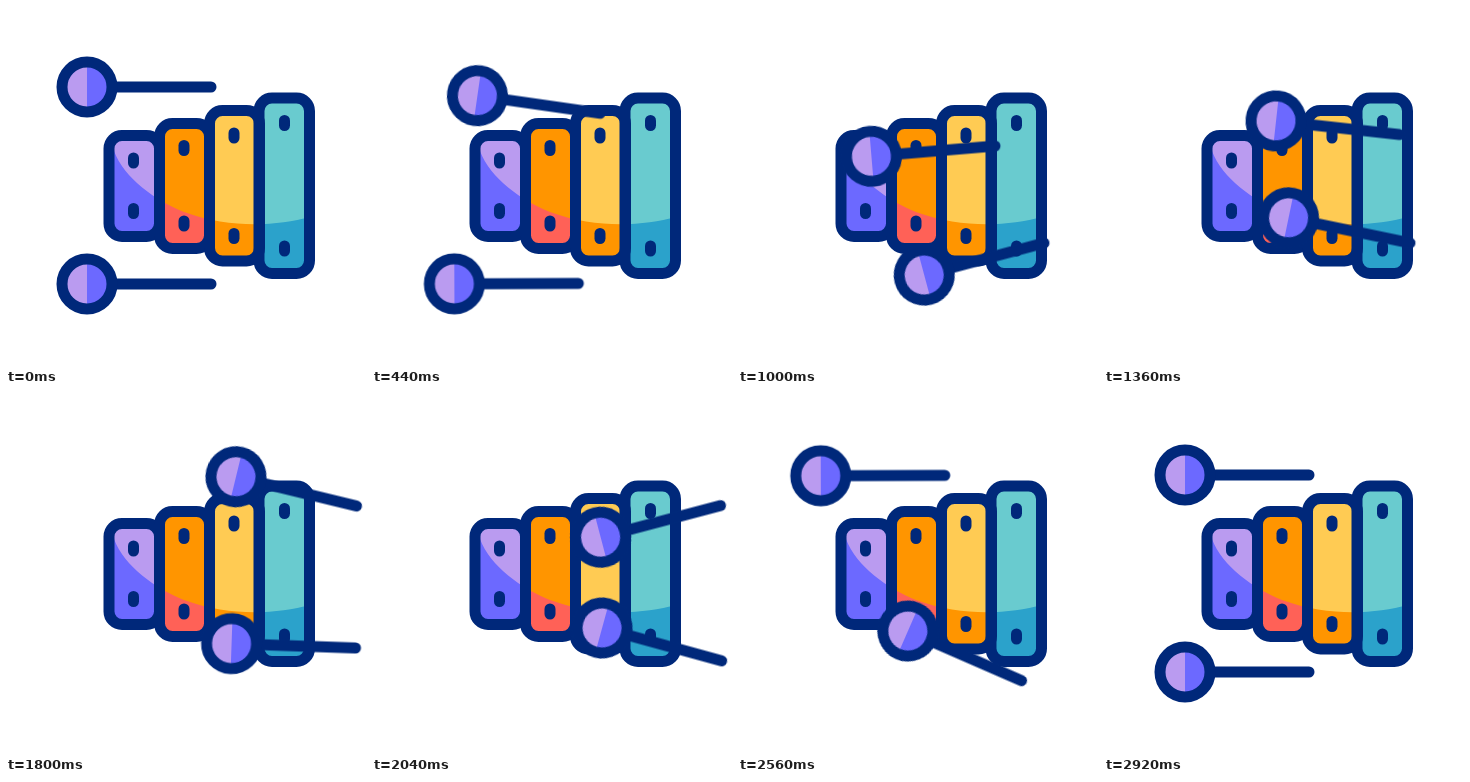
Animation of 360 by 360 pixels, one loop 3000 ms. Source, as an HTML page:

```html
<!DOCTYPE html>
<html lang="en">
<head>
<meta charset="utf-8">
<title>Xylophone</title>
<style>
  html, body { margin: 0; width: 100%; height: 100%; overflow: hidden; background: #fff; }
  svg { display: block; width: 100vw; height: 100vh; }
  .line { fill: none; stroke: #00287a; stroke-width: 11; stroke-linecap: round; }
  .mallet { animation: 3s cubic-bezier(.33, 0, .67, 1) infinite; }
  #top { animation-name: top; }
  #bottom { animation-name: bottom; }

  /* Each pose places the tip of the handle, then turns the mallet around it. */
  @keyframes top {
    0%, 6.667%       { transform: translate(205px, 81px) rotate(0deg); }
    24%, 25%         { transform: translate(257px, 140px) rotate(18.3deg); }
    34.667%, 36%     { transform: translate(257px, 140px) rotate(-6deg); }
    57.333%          { transform: translate(350.5px, 112px) rotate(24deg); }
    65.333%, 66.667% { transform: translate(350.5px, 112px) rotate(-15deg); }
    86.667%, 100%    { transform: translate(205px, 81px) rotate(0deg); }
  }
  @keyframes bottom {
    0%, 13.333%      { transform: translate(205px, 278px) rotate(0deg); }
    33.333%, 34.667% { transform: translate(306px, 237px) rotate(-15deg); }
    45.333%, 46.667% { transform: translate(306px, 237px) rotate(11.7deg); }
    60%, 64%         { transform: translate(349.5px, 254px) rotate(2deg); }
    74.667%          { transform: translate(350px, 294px) rotate(43.5deg); }
    97.333%, 100%    { transform: translate(205px, 278px) rotate(0deg); }
  }
</style>
</head>
<body>
<svg viewBox="0 0 360 360">
  <defs>
    <rect id="bar1" x="103" y="129.5" width="50.5" height="101" rx="13"/>
    <rect id="bar2" x="153.5" y="117.5" width="50" height="125" rx="13"/>
    <rect id="bar3" x="203.5" y="104.5" width="50" height="150.5" rx="13"/>
    <rect id="bar4" x="253" y="92" width="50.5" height="175.5" rx="13"/>
    <path id="hole" d="M0-2.5V2.5"/>
    <clipPath id="shade">
      <path d="M108 145C118 172 150 195 178 206C225 223 270 220 304 211V280H100V145Z"/>
    </clipPath>
    <g id="mallet">
      <path class="line" d="M-95 0H0"/>
      <circle cx="-124" r="25" fill="#ba9bf0"/>
      <path d="M-124-25A25 25 0 0 1-124 25Z" fill="#6c69ff"/>
      <circle class="line" cx="-124" r="25"/>
    </g>
  </defs>

  <use href="#bar1" fill="#ba9bf0"/>
  <use href="#bar2" fill="#ff9500"/>
  <use href="#bar3" fill="#ffcb53"/>
  <use href="#bar4" fill="#69cbcf"/>
  <g clip-path="url(#shade)">
    <use href="#bar1" fill="#6c69ff"/>
    <use href="#bar2" fill="#ff6157"/>
    <use href="#bar3" fill="#ff9500"/>
    <use href="#bar4" fill="#2ba2cb"/>
  </g>
  <g class="line">
    <use href="#bar1"/>
    <use href="#bar2"/>
    <use href="#bar3"/>
    <use href="#bar4"/>
    <use href="#hole" x="127.5" y="154.5"/>
    <use href="#hole" x="127.5" y="205"/>
    <use href="#hole" x="178" y="142"/>
    <use href="#hole" x="178" y="217.5"/>
    <use href="#hole" x="228" y="129.5"/>
    <use href="#hole" x="228" y="230"/>
    <use href="#hole" x="278.5" y="117"/>
    <use href="#hole" x="278.5" y="242.5"/>
  </g>

  <g id="top" class="mallet"><use href="#mallet"/></g>
  <g id="bottom" class="mallet"><use href="#mallet"/></g>
</svg>
</body>
</html>
```
